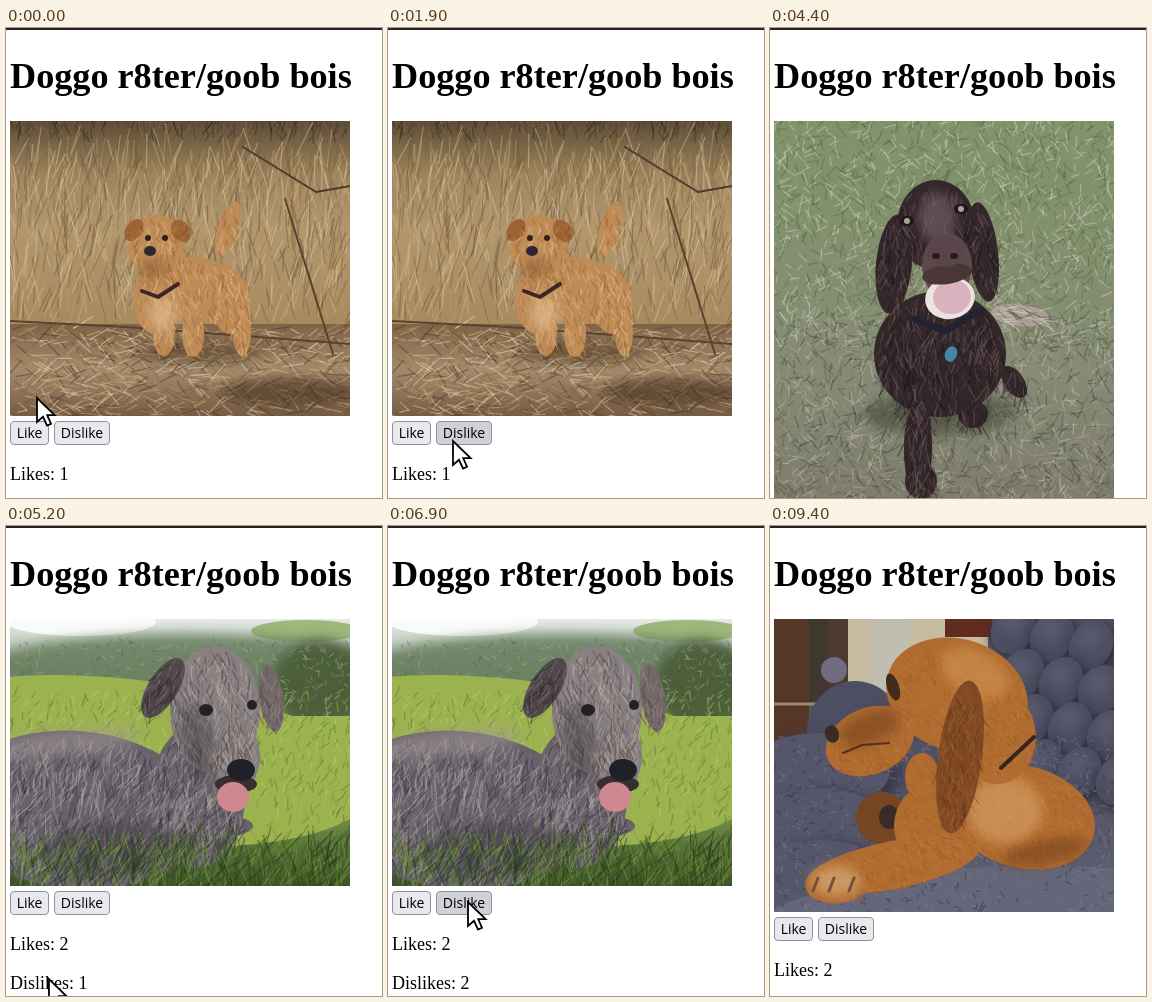
Write an HTML page with a canvas that moves like this. It is 376 px wide and 470 px high and loops after 9.5 s.

```html
<!DOCTYPE html>
<html lang="en">
<head>
<meta charset="utf-8">
<title>Doggo r8ter</title>
<style>
html, body { margin: 0; width: 100%; height: 100%; overflow: hidden; background: #fff; }
#stage { position: relative; width: 376px; height: 470px; overflow: hidden; background: #fff;
  color: #000; font-family: "Liberation Serif", "Times New Roman", serif; }
#stage > * { position: absolute; margin: 0; white-space: nowrap; }
#bar { left: 0; top: 0; width: 376px; height: 2px; background: #2b2229; }
h1 { left: 4px; top: 28px; font-size: 36.2px; line-height: 40px; font-weight: bold; }
p { left: 4px; font-size: 18px; line-height: 20px; }
.btn { box-sizing: border-box; height: 24px; border: 1px solid #8f8f9d; border-radius: 4px;
  background: #e9e9ed; font: 14px/22px "Open Sans", "Noto Sans", sans-serif; text-align: center; }
.btn.over { background: #d0d0d7; }
#like { left: 4px; width: 39px; }
#dislike { left: 48px; width: 56px; }
canvas, #cursor { left: 0; top: 0; }
</style>
</head>
<body>
<div id="stage">
  <div id="bar"></div>
  <h1>Doggo r8ter/goob bois</h1>
  <canvas id="photo" width="376" height="470"></canvas>
  <div class="btn" id="like">Like</div>
  <div class="btn" id="dislike">Dislike</div>
  <p id="likes"></p>
  <p id="dislikes"></p>
  <svg id="cursor" width="24" height="32" viewBox="-2 -2 24 32">
    <path d="M0 0V24L6 18.8L10 27.5L14 25.7L10.2 17.2H17.6Z" fill="#fff" stroke="#000" stroke-width="1.8"/>
  </svg>
</div>
<script>
const LEFT = 4, TOP = 93, WIDTH = 340, RIGHT = LEFT + WIDTH;
const LOOP = 9500, STEP = 100, SWAP = 2500;
const $ = id => document.getElementById(id);
let g, seed;

function rnd() {
  seed = (seed * 1664525 + 1013904223) >>> 0;
  return seed / 4294967296;
}
const pick = list => list[Math.floor(rnd() * list.length)];

function line(color, width, ...p) {
  g.strokeStyle = color;
  g.lineWidth = width;
  g.beginPath();
  for (let i = 0; i < p.length; i += 2) g.lineTo(p[i], p[i + 1]);
  g.stroke();
}

function oval(color, x, y, rx, ry = rx, turn = 0) {
  g.fillStyle = color;
  g.beginPath();
  g.ellipse(x, y, rx, ry, turn, 0, 7);
  g.fill();
}

function soft(color, ...shape) {
  g.filter = 'blur(6px)';
  oval(color, ...shape);
  g.filter = 'none';
}

// Vertical gradient across the photo
function band(y0, y1, ...colors) {
  const grad = g.createLinearGradient(0, y0, 0, y1);
  colors.forEach((c, i) => grad.addColorStop(i / Math.max(1, colors.length - 1), c));
  g.fillStyle = grad;
  g.fillRect(LEFT, y0, WIDTH, y1 - y0);
}

function blade(colors, x, y, length, angle, spread) {
  const a = angle + (rnd() - .5) * spread, l = length * (.4 + rnd() * .6);
  line(pick(colors), 1.2, x, y, x + Math.cos(a) * l, y + Math.sin(a) * l);
}

// Blades spread evenly over a strip, drawn from back to front
function grass(n, y0, y1, length, angle, spread, colors) {
  g.globalAlpha = .5;
  for (let i = 0; i < n; i++) {
    blade(colors, LEFT + rnd() * WIDTH, y0 + (y1 - y0) * i / n, length, angle, spread);
  }
  g.globalAlpha = 1;
}

// Ovals of one colour with hair in proportion to their area
function coat([base, ...hairs], length, angle, ...parts) {
  parts.forEach(part => oval(base, ...part));
  g.globalAlpha = .5;
  for (const [x, y, rx, ry, turn = 0] of parts) {
    const c = Math.cos(turn), s = Math.sin(turn);
    for (let n = rx * ry / 8; n > 0; n--) {
      const a = rnd() * 2 * Math.PI, r = Math.sqrt(rnd()) * .95;
      const u = rx * r * Math.cos(a), v = ry * r * Math.sin(a);
      blade(hairs, x + u * c - v * s, y + u * s + v * c, length, angle, 1.3);
    }
  }
  g.globalAlpha = 1;
}

function terrier() {
  const straw = ['#dfc8a0', '#d0b486', '#7d6340', '#c49b67', '#6d573b'];
  band(TOP, 200, '#5d4c36', '#9c845e', '#b1966e');
  band(200, 296, '#b1966e', '#a88a60');
  band(296, 388, '#806347', '#a38a6b', '#765c44');
  grass(180, TOP, 115, 16, -1.5, 1.3, ['#2f291e', '#463b28', '#806d4c']);
  grass(800, 130, 296, 40, -1.5, .9, straw);
  grass(700, 300, 388, 22, .1, 2, [...straw, '#4a3626', '#eee0c8']);
  soft('rgba(65,43,29,.55)', 285, 364, 70, 14);
  line('#5b4130', 2, LEFT, 293, 120, 299, RIGHT, 316);
  line('#4f3a2a', 2, 237, 119, 310, 164, RIGHT, 158);
  line('#59412e', 2, 279, 171, 327, 326);
  soft('rgba(65,44,25,.5)', 195, 324, 65, 9);

  const tan = ['#bd8b56', '#e4be8c', '#9c6535', '#cf9a60'];
  coat(tan, 11, 1.4, [222, 200, 10, 28, .3], [188, 262, 54, 33, .1], [225, 276, 20, 30],
    [150, 272, 23, 34], [158, 306, 11, 22], [187, 306, 11, 23], [236, 305, 9, 23]);
  soft('rgba(224,186,138,.7)', 156, 285, 15, 18);
  line('#40242a', 4, 136, 263, 152, 269, 172, 256);
  coat(tan, 10, 1.5, [151, 218, 29, 31]);
  coat(['#9c6335', '#ba8450', '#7e4b27'], 6, 1.5, [128, 202, 8, 12, .6], [175, 203, 9, 12, -.6]);
  soft('rgba(117,68,34,.5)', 147, 240, 12, 9);
  for (const x of [142, 159]) oval('#302019', x, 210, 3);
  oval('#2d2631', 144, 223, 6, 5);
}

function spaniel() {
  const green = ['#c6d0b2', '#587345', '#91a67a', '#4d6440', '#d2d3c4'];
  band(TOP, 470, '#81936b', '#838f6e', '#868a75', '#7e7c6b');
  grass(1900, TOP, 320, 13, -1.4, 2.6, green);
  grass(1700, 290, 480, 14, -1.2, 2.8, ['#c5c1b2', '#555b47', '#989a84', '#484a3d', '#aaa195']);
  soft('rgba(43,47,34,.45)', 170, 385, 75, 22);

  const brown = ['#33272a', '#75625f', '#1c171b', '#534043', '#2a2024'];
  coat(['#aaa096', '#ddd3c8', '#655b54'], 20, .2, [250, 287, 29, 11, .1]);
  coat(brown, 20, 1.6, [170, 326, 66, 63], [148, 420, 14, 52], [151, 453, 16, 18],
    [203, 386, 15, 14], [244, 354, 10, 18, -.6]);
  coat(brown, 16, 1.6, [166, 197, 39, 45], [124, 236, 18, 50, .1], [213, 224, 15, 50, -.12]);
  soft('rgba(125,104,110,.6)', 167, 190, 19, 26);
  oval('#5d494b', 177, 238, 25, 33);
  oval('#eee1e2', 180, 270, 25, 21, -.2);
  oval('#d9b2bd', 182, 269, 19, 17, -.2);
  oval('#493638', 177, 246, 25, 10, -.15);
  oval('#5a454a', 175, 224, 18, 15);
  for (const side of [-1, 1]) {
    oval('#251c20', 175 + side * 9, 228, 4, 3);
    oval('#1d1719', 164 + side * 27, 187 - side * 6, 7, 5);
    oval('#aaa39e', 164 + side * 27, 187 - side * 6, 3);
  }
  line('#222231', 7, 145, 291, 175, 303, 211, 282);
  oval('#4686a5', 181, 326, 6, 8, .4);
}

function wolfhound() {
  const leaf = ['#a4ae82', '#576c42', '#778b5b', '#819880'];
  const meadow = ['#c2ce7a', '#768d37', '#a9bd58', '#597333'];
  band(TOP, 193, '#e5eae8', '#a3b297', '#6c805b');
  oval('#f9fbf8', 75, 96, 75, 14);
  oval('#9eb77b', 300, 105, 55, 11);
  soft('rgba(95,119,88,.8)', 180, 148, 220, 40);
  soft('rgba(63,80,42,.7)', 315, 158, 48, 45);
  grass(450, 115, 180, 7, -1, 6, leaf);
  band(190, 360, '#9bb351', '#9cb653', '#688340', '#3c5326');
  oval('#9cb24f', 120, 235, 250, 82, .11);
  grass(800, 170, 300, 11, -1.3, 1.5, meadow);

  const gray = ['#69626b', '#aaa09f', '#37313c', '#857b83', '#515066', '#b9aea5'];
  const pale = ['#888081', '#c3b8b0', '#4a4246', '#a49995', '#695f64'];
  coat(gray, 20, 1.9, [70, 284, 128, 79, .08], [192, 270, 47, 72], [221, 300, 26, 10]);
  soft('rgba(165,155,151,.5)', 60, 217, 75, 13, -.1);
  soft('rgba(49,43,56,.4)', 115, 325, 80, 28);
  coat(pale, 16, 1.5, [209, 184, 45, 64], [230, 230, 24, 36]);
  soft('rgba(60,53,56,.45)', 192, 216, 16, 40, -.2);
  coat(['#51484b', '#81757a', '#2f292e'], 15, 2, [157, 162, 15, 34, .55]);
  coat(['#736867', '#978b88', '#51484b'], 12, 1.5, [265, 172, 12, 34, -.15]);
  oval('#242027', 200, 184, 7, 6);
  oval('#252027', 246, 179, 5);
  oval('#382e32', 230, 258, 21, 9);
  oval('#cf8790', 227, 271, 16, 15);
  oval('#1f2028', 235, 244, 14, 11);
  grass(650, 325, 372, 34, -1.3, 1.5, ['#2d4821', '#4f7130', '#7e993f', '#213618']);
}

function bloodhound() {
  band(TOP, 386, '#565465', '#505062', '#606276');
  const wall = [[4, 54, 85, '#40382f'], [4, 35, 180, '#553728'], [58, 20, 80, '#4c3a2e'],
    [78, 140, 75, '#c7bca1'], [100, 40, 75, '#bfbeb0'], [175, 47, 18, '#612b20']];
  for (const [x, w, h, color] of wall) {
    g.fillStyle = color;
    g.fillRect(x, TOP, w, h);
  }
  line('#9e8a67', 3, LEFT, 178, 56, 178);
  oval('#716b80', 64, 144, 13);
  // Tufted sofa back
  for (let row = 0; row < 4; row++) {
    for (let col = 0; col < 3; col++) {
      const x = 243 + col * 39 + row * 9, y = 103 + row * 45 + col * 8;
      soft('#303140', x + 3, y + 4, 24, 28, .5);
      oval('#4d4e61', x, y, 21, 26, .5);
      soft('rgba(111,113,133,.35)', x - 2, y - 8, 13, 12);
    }
  }
  oval('#4d4e62', 85, 205, 48, 50);
  for (const y of [245, 300, 352]) {
    soft('#383a4c', 55, y + 6, 75, 42);
    oval('#555669', 48, y, 72, 38);
  }
  oval('#646679', 205, 388, 220, 46, -.07);
  grass(1000, 210, 390, 6, .2, 3, ['#7f8194', '#34364a', '#6b6e82']);

  const red = ['#b06b30', '#bf7d3d', '#a05e29', '#b97536'];
  oval('#764521', 112, 292, 26, 26);
  oval('#3a2b29', 119, 291, 10, 12);
  coat(red, 9, .8, [253, 291, 73, 51, .25], [162, 300, 38, 42], [123, 339, 88, 24, -.2], [68, 357, 33, 20, -.1]);
  soft('rgba(220,170,108,.55)', 235, 284, 38, 34);
  soft('rgba(217,178,127,.65)', 66, 355, 25, 15);
  soft('rgba(107,58,25,.5)', 275, 326, 45, 12, -.2);
  coat(red, 8, .9, [187, 169, 72, 56, .3], [227, 211, 39, 47], [100, 215, 46, 33, -.4], [152, 251, 17, 24]);
  soft('rgba(218,158,88,.5)', 205, 148, 37, 23, .5);
  soft('rgba(112,61,29,.55)', 99, 202, 32, 15, -.4);
  coat(['#804923', '#9c6434', '#65391e'], 15, 1.6, [190, 231, 22, 77, .13]);
  oval('#442b20', 123, 161, 6, 14, -.3);
  oval('#392a28', 62, 208, 7, 9, -.3);
  line('#593017', 2, 73, 227, 92, 219, 119, 217);
  line('#35251d', 4, 264, 211, 231, 242);
  for (const x of [48, 64, 84]) line('#765037', 3, x, 352, x - 5, 365);
}

const dogs = [[terrier, 295], [spaniel, 453], [wolfhound, 267], [bloodhound, 293]].map(([draw, h]) => {
  const sheet = document.createElement('canvas');
  sheet.width = 376;
  sheet.height = 470;
  g = sheet.getContext('2d');
  g.lineCap = g.lineJoin = 'round';
  g.beginPath();
  g.rect(LEFT, TOP, WIDTH, h);
  g.clip();
  seed = h;
  draw();
  return { sheet, bottom: TOP + h };
});

// Pointer moves: from time, to time, x, y
const moves = [
  [0, 100, 34, 426], [400, 1500, 65, 413], [2000, 2300, 30, 408],
  [3100, 3400, 30, 480], [5000, 5600, 80, 376], [7000, 7500, 84, 480]
];

function pointer(t) {
  let x = 31, y = 370;
  for (const [from, to, tx, ty] of moves) {
    const u = Math.min(1, Math.max(0, (t - from) / (to - from))), k = u * u * (3 - 2 * u);
    x += (tx - x) * k;
    y += (ty - y) * k;
  }
  return [x, y];
}

const view = $('photo').getContext('2d');
let shown = -1;

function render(time) {
  const t = Math.floor(time % LOOP / STEP) * STEP;
  const index = Math.floor(t / SWAP), { sheet, bottom } = dogs[index];
  if (index !== shown) {
    view.clearRect(0, 0, 376, 470);
    view.drawImage(sheet, 0, 0);
    shown = index;
  }
  const [x, y] = pointer(t), top = bottom + 5;
  const place = (id, v) => { $(id).style.top = v + 'px'; };
  const hover = (id, a, b) => $(id).classList.toggle('over', x >= a && x < b && y >= top && y < top + 24);
  place('like', top);
  place('dislike', top);
  place('likes', bottom + 48);
  place('dislikes', bottom + 87);
  hover('like', 4, 43);
  hover('dislike', 48, 104);
  $('likes').textContent = 'Likes: ' + (t < 2400 ? 1 : 2);
  $('dislikes').textContent = 'Dislikes: ' + (t < 2000 ? 0 : t < 6500 ? 1 : 2);
  $('cursor').style.transform = `translate(${x - 2}px, ${y - 2}px)`;
}

const start = performance.now();
function tick() {
  render(performance.now() - start);
  requestAnimationFrame(tick);
}
tick();
</script>
</body>
</html>
```
